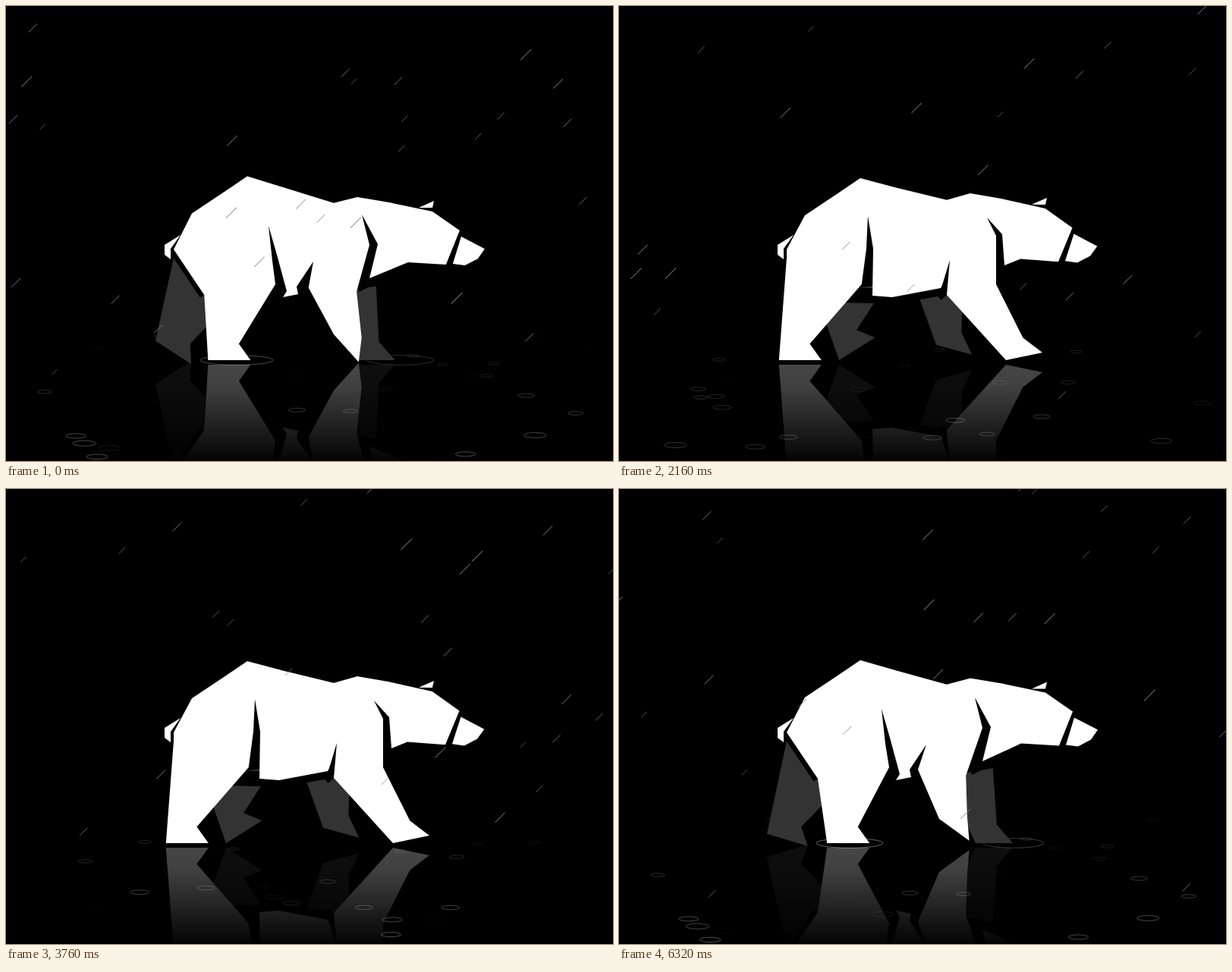
Recreate the animation shown at these times as an HTML page. Size 800x600 px, loop 6.4 s.

```html
<!DOCTYPE html>
<html lang="en">
<head>
<meta charset="utf-8">
<title>Bear walking in the rain</title>
<style>
  html, body { margin: 0; width: 100%; height: 100%; overflow: hidden; background: #000; }
  svg { display: block; width: 800px; height: 600px; }
</style>
</head>
<body>
<svg viewBox="0 0 800 600">
  <defs>
    <linearGradient id="fade" x1="0" y1="0" x2="0" y2="1">
      <stop offset="0" stop-color="#000" stop-opacity="0"/>
      <stop offset=".25" stop-color="#000" stop-opacity=".1"/>
      <stop offset="1" stop-color="#000" stop-opacity=".95"/>
    </linearGradient>
  </defs>
  <rect width="800" height="600"/>
  <g id="splash" fill="none" stroke="#666" stroke-width="1"></g>
  <g transform="matrix(1 0 0 -1 0 940)" opacity=".28"><use href="#bear"/></g>
  <rect y="470" width="800" height="130" fill="url(#fade)"/>
  <g id="rings" fill="none" stroke="#aaa" stroke-width="1"></g>
  <g id="bear">
    <polygon id="farHind" fill="#333"/>
    <polygon id="farFront" fill="#333"/>
    <g fill="none" stroke="#000">
      <polyline id="rearShade" stroke-width="13"/>
      <polyline id="bellyShade" stroke-width="20"/>
      <polyline id="neckShade" stroke-width="20"/>
    </g>
    <g fill="#fff">
      <polygon points="230,302 209,315 209,328 217,334 217,320"/>
      <polygon id="body"/>
      <polygon id="snout"/>
      <polygon id="ear"/>
    </g>
  </g>
  <g id="rain" stroke="#808080" stroke-width="1.1"></g>
</svg>
<script>
const LOOP = 6400, STRIDE = 1600, HALF = 800, STEP = 80;
const RUMP = [221, 321];
const $ = id => document.getElementById(id);
const clamp = (v, lo, hi) => Math.min(hi, Math.max(lo, v));
const mix = (a, b, k) => a + (b - a) * k;
const wave = (t, peak, period) => Math.cos((t - peak) / period * 2 * Math.PI);
const points = s => s.split(' ').map(p => p.split(',').map(Number));

// Outline of back and head at rest.
const spine = points('245,274 290,244 318,225 365,239 432,259 463,251 505,258 562,270 598,295 580,340 530,337');
const snout = points('600,303 631,319 622,332 605,341 589,339');
const ear = points('544,265 564,256 562,265');

// Shoulder crease and belly, at rest and with the near foreleg reaching out.
const restFolds = points('479,359 490,314 469,275 479,315 405,337 383,370 385,380 365,384 370,376 357,328 346,290 351,336');
const reachFolds = points('508,342 505,301 485,279 497,303 436,335 426,368 424,372 360,384 334,382 335,320 328,277 326,320');

const front = {
  heel: [[0, 432], [400, 512], [560, 510], [720, 470], [1360, 418], [1520, 422]],
  pitch: [[0, 48], [400, -35], [640, 0], [1240, 0], [1520, 36]],
  lift: { start: 1240, time: 760, height: 34 },
  foot: 49, ankle: 37, bend: 41,
  top(t) {
    const c = wave(t, 560, STRIDE);
    return [[475 + 22 * c, 373 - 6 * c], [411 + 21 * c, 375 + 6 * c]];
  }
};

const hind = {
  heel: [[720, 195], [1000, 202], [1200, 235], [1360, 290]],
  pitch: [[640, 0], [800, 33], [1200, 34], [1360, -32], [1500, 0]],
  lift: { start: 680, time: 680, height: 40 },
  foot: 56, ankle: 46, bend: 28,
  top(t) {
    const c = wave(t, 1520, STRIDE), tuck = Math.max(0, c) ** 0.35;
    return [[336 + 20 * c, 367], [221 + 41 * tuck, 332 + 50 * tuck]];
  }
};

// Value at time t on a cyclic line through [time, value] pairs.
function along(keys, t) {
  const [start] = keys[0];
  const s = start + (t - start + 2 * STRIDE) % STRIDE;
  const ring = [...keys, [start + STRIDE, keys[0][1]]];
  const i = ring.findIndex(([time]) => time > s);
  const [t0, a] = ring[i - 1], [t1, b] = ring[i];
  return mix(a, b, (s - t0) / (t1 - t0));
}

function leg({ heel, pitch, lift, foot, ankle, bend, top }, time) {
  const t = time % STRIDE;
  const swing = (t - lift.start + STRIDE) % STRIDE / lift.time;
  const rise = swing < 1 ? lift.height * Math.sin(swing * Math.PI) ** 0.7 : 0;
  const x = along(heel, t), y = 467 - rise, angle = along(pitch, t);
  const reach = (len, deg) => {
    const r = deg * Math.PI / 180;
    return [x + len * Math.cos(r), y + len * Math.sin(r)];
  };
  const [fore, aft] = top(t);
  return [fore, reach(ankle, angle - bend), reach(foot, angle), [x, y], aft];
}

// The trunk sways and the head nods twice in each stride.
function posture(t) {
  const sway = 4 * wave(t, 170, HALF);
  const nod = 0.12 * (0.5 + 0.5 * wave(t, 310, HALF)) ** 2;
  return ([x, y]) => {
    const dy = sway * clamp((x - 375) / 70, -0.5, 1);
    const turn = x > 480 ? nod : 0;
    return [x - turn * (y - 255), y + dy + turn * (x - 480)];
  };
}

const draw = (id, pts) =>
  $(id).setAttribute('points', pts.map(p => p.map(v => v.toFixed(1)).join()).join(' '));

function make(parent, tag) {
  return $(parent).appendChild(document.createElementNS('http://www.w3.org/2000/svg', tag));
}
function set(el, attrs) {
  for (const name in attrs) el.setAttribute(name, attrs[name]);
}

function drawBear(t) {
  const move = posture(t), back = spine.map(move);
  const reach = Math.max(0, wave(t, 560, STRIDE));
  const fold = restFolds.map((p, i) => p.map((v, j) => mix(v, reachFolds[i][j], reach)));
  const fore = leg(front, t), haunch = leg(hind, t);
  const chin = fold[0];
  draw('farHind', leg(hind, t + HALF));
  draw('farFront', leg(front, t + HALF));
  draw('rearShade', [RUMP, haunch[4]]);
  draw('bellyShade', [[290, 381], fold[8], fold[7], fold[6], fore[4]]);
  draw('neckShade', [[chin[0] - 18, chin[1] + 9], chin, back[10]]);
  draw('body', [RUMP, ...back, ...fold.slice(0, 4), ...fore, ...fold.slice(4), ...haunch]);
  draw('snout', snout.map(move));
  draw('ear', ear.map(move));
}

function rand(n) {
  const v = Math.sin(n * 12.9898 + 4.1) * 43758.5453;
  return v - Math.floor(v);
}

const RING_LIFE = 1280;
const rings = Array.from({ length: 24 }, () => make('rings', 'ellipse'));

function drawRings(t) {
  rings.forEach((el, i) => {
    const time = (t + rand(i + 0.5) * RING_LIFE) % LOOP;
    const seed = i * 31 + Math.floor(time / RING_LIFE) * 5.7;
    const age = time % RING_LIFE / RING_LIFE;
    const depth = rand(seed + 1);
    const r = 5 + depth * 5 + rand(seed + 2) * 6 * depth + age * 2;
    set(el, {
      cx: 40 + rand(seed + 3) * 740, cy: 430 + depth * 165, rx: r, ry: r * 0.23,
      opacity: Math.sin(age * Math.PI) * (0.12 + depth * 0.35)
    });
  });
}

const splashes = [304, 520].map(x => [x, make('splash', 'ellipse')]);

function drawSplashes(t) {
  const age = (t + 160) % HALF;
  splashes.forEach(([x, el], i) => set(el, {
    cx: x, cy: 467, rx: 40 + age * 0.05 - i * 4, ry: 6.3,
    opacity: Math.max(0, 1 - age / 420) * (i ? 0.7 : 1.2)
  }));
}

const FALL = 400;
const drops = Array.from({ length: 42 }, () => make('rain', 'line'));

function drawRain(t) {
  drops.forEach((el, i) => {
    const time = (t + rand(i + 1) * FALL) % LOOP;
    const seed = i * 97 + Math.floor(time / FALL) * 7.3;
    const size = 7 + rand(seed + 2) * 8;
    const land = 430 + rand(seed + 3) * 170;
    const y = -20 + time % FALL / FALL * (land + 20);
    const x = rand(seed + 5) * 1350 - (y + 20) * 0.93;
    set(el, {
      x1: x, y1: y, x2: x + size, y2: y - size,
      opacity: 0.4 + (size - 7) * 0.05
    });
  });
}

function frame(now) {
  const t = Math.floor((now + 1) / STEP) * STEP % LOOP;
  drawBear(t);
  drawRings(t);
  drawSplashes(t);
  drawRain(t);
  requestAnimationFrame(frame);
}
frame(0);
</script>
</body>
</html>
```
